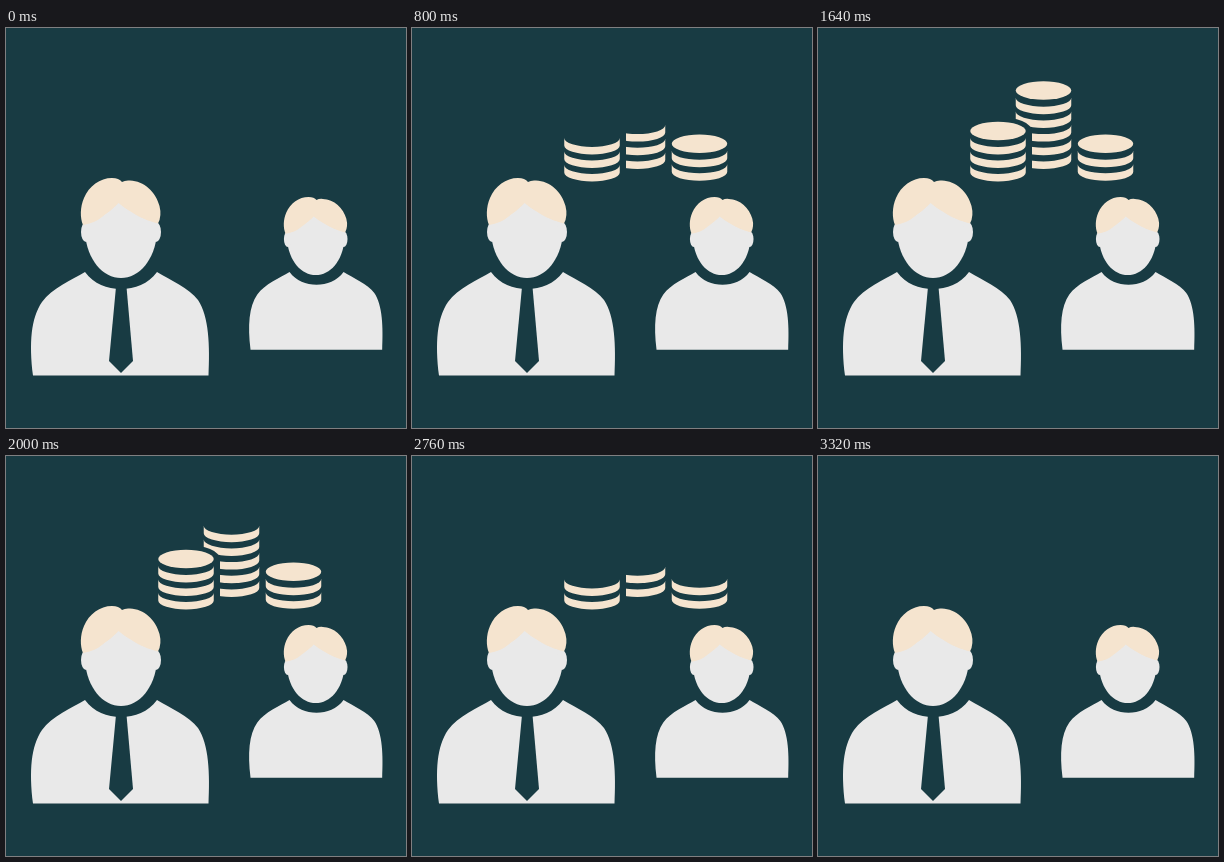
An HTML page that plays this animation: 400 px wide and 400 px high, repeating every 3800 ms.

```html
<!DOCTYPE html>
<html lang="en">
<head>
<meta charset="utf-8">
<title>Coin stacks</title>
<style>
html, body { margin: 0; height: 100%; overflow: hidden; background: #183b43; }
svg { display: block; width: 100%; height: 100%; }
</style>
</head>
<body>
<svg viewBox="0 0 400 400">
  <defs>
    <g id="head">
      <path fill="#e9e9e9" d="M79 185V205C81 232 97 250 115 250S149 232 151 205V185L113 172Z"/>
      <ellipse cx="80" cy="204" rx="5" ry="10" fill="#e9e9e9"/>
      <ellipse cx="150" cy="204" rx="5" ry="10" fill="#e9e9e9"/>
      <path fill="#f5e4cf" d="M77 197C74 190 74 179 78 170C83 158 94 150 106 150Q113 150 116 154Q119 152 124 152.500C138 153 150 164 153.500 178Q156 188 152 195.500C142 193 133 189 127 185Q118 180 112.500 175C106 182 101 185 96 189Q89 195 77 197Z"/>
    </g>
    <path id="body" fill="#e9e9e9" d="M27 347.500C23 315 25 290 36 274C46 260 66 252 79 244C88 256 101 261 115 261S142 256 151 244C164 252 183 260 192 272C203 288 204 318 202.500 347.500Z"/>
    <!-- Leaves a margin around the front stack -->
    <clipPath id="behind"><path d="M190 0H260V160H214V103A34 14 0 0 0 180 89V0Z"/></clipPath>
  </defs>
  <use href="#body"/>
  <path fill="#183b43" d="M110 259H120.500L127 333L115 345L103 333Z"/>
  <use href="#head"/>
  <use href="#body" transform="translate(224.300 61) scale(.75)"/>
  <use href="#head" transform="translate(218.300 52) scale(.795 .78)"/>
  <g id="coins" fill="#f5e4cf"></g>
</svg>
<script>
const NS = 'http://www.w3.org/2000/svg';
const coins = document.getElementById('coins');
const layers = [];

// Each stack is a number of curved rims closed by a full top face.
function addStack(cx, base, rims, pitch, clip) {
  const group = coins.appendChild(document.createElementNS(NS, 'g'));
  if (clip) group.setAttribute('clip-path', clip);
  const left = cx - 27.75, right = cx + 27.75;
  for (let i = 0; i <= rims; i++) {
    const y = base - i * pitch;
    const path = group.appendChild(document.createElementNS(NS, 'path'));
    path.setAttribute('d', i < rims
      ? `M${left} ${y}A27.75 9 0 0 0 ${right} ${y}v7.500A27.75 9 0 0 1 ${left} ${y + 7.5}Z`
      : `M${left} ${y + 6.5}a27.75 9.200 0 0 1 55.500 0a27.75 9.200 0 0 1 -55.500 0Z`);
    layers.push({ path, level: i + 1 });
  }
}

addStack(180, 137, 3, 13.5);
addStack(225.5, 124.5, 5, 13.7, 'url(#behind)');
addStack(287.5, 136.3, 2, 13.5);

const rises = [240, 520, 800, 1080, 1360, 1640];
const falls = [2000, 2240, 2480, 2760, 3040, 3320];
const start = performance.now();

function draw() {
  const t = Math.max(0, performance.now() - start) % 3800;
  const passed = times => times.filter(x => t >= x).length;
  const level = passed(rises) - passed(falls);
  for (const layer of layers)
    layer.path.style.display = layer.level <= level ? '' : 'none';
  requestAnimationFrame(draw);
}
draw();
</script>
</body>
</html>
```
